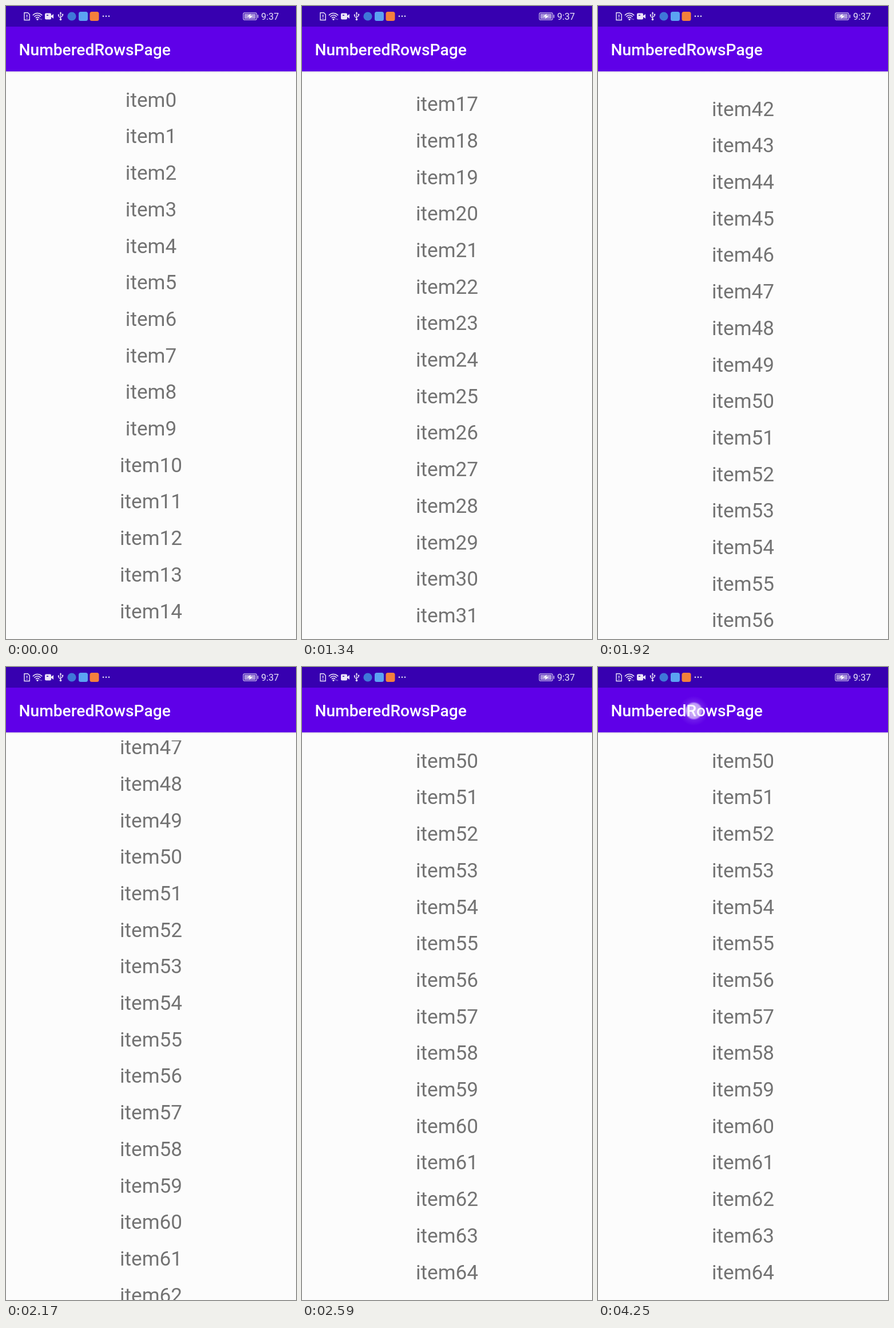
These frames come from a looping animation (507x1104 px, 4.33 s). An HTML page with a canvas:

```html
<!DOCTYPE html>
<html lang="en">
<head>
<meta charset="utf-8">
<title>Scrolling list</title>
<style>
  html, body { margin: 0; width: 100%; height: 100%; overflow: hidden; background: #fcfcfc; }
  canvas { display: block; }
</style>
</head>
<body>
<canvas id="stage" width="507" height="1104"></canvas>
<script>
const ctx = document.getElementById('stage').getContext('2d');
const W = 507, H = 1104;
const LOOP = 4330, FPS = 12;
const PITCH = 63.7, FIRST_BASELINE = 175.7, LIST_TOP = 128, BAR_BOTTOM = 114;
const FLING = { start: 1074, shown: 1090, duration: 1416, items: 50, power: 1.98 };
const INK = '#ece5f8';

function rect(x, y, w, h, color) {
  ctx.fillStyle = color;
  ctx.fillRect(x, y, w, h);
}

function roundRect(x, y, w, h, r, color) {
  ctx.fillStyle = color;
  ctx.beginPath();
  ctx.roundRect(x, y, w, h, r);
  ctx.fill();
}

function disc(x, y, r, color) {
  ctx.fillStyle = color;
  ctx.beginPath();
  ctx.arc(x, y, r, 0, Math.PI * 2);
  ctx.fill();
}

function path(d, width, color = INK) {
  const shape = new Path2D(d);
  if (width) {
    ctx.strokeStyle = color;
    ctx.lineWidth = width;
    ctx.stroke(shape);
  } else {
    ctx.fillStyle = color;
    ctx.fill(shape);
  }
}

function text(str, x, y, font, color, align = 'left') {
  ctx.font = font + ' Roboto, sans-serif';
  ctx.fillStyle = color;
  ctx.textAlign = align;
  ctx.fillText(str, x, y);
}

// The fling slows down almost evenly until it rests on a whole row.
function scrollAt(time) {
  if (time <= FLING.shown) return 0;
  const p = Math.min((time - FLING.start) / FLING.duration, 1);
  return FLING.items * PITCH * (1 - (1 - p) ** FLING.power);
}

function drawList(scroll) {
  ctx.save();
  ctx.beginPath();
  ctx.rect(0, LIST_TOP, W, H - LIST_TOP);
  ctx.clip();
  const first = Math.max(0, Math.floor(scroll / PITCH) - 1);
  for (let i = first; i < first + 18; i++) {
    text('item' + i, W / 2, FIRST_BASELINE + i * PITCH - scroll, '35.2px', '#737373', 'center');
  }
  ctx.restore();
}

function drawWifi(active) {
  ctx.lineCap = 'round';
  for (const r of [3.5, 7, 10.5]) {
    ctx.strokeStyle = INK;
    ctx.lineWidth = 1.6;
    ctx.beginPath();
    ctx.arc(55, 23, r, -Math.PI * 0.76, -Math.PI * 0.24);
    ctx.stroke();
  }
  ctx.lineCap = 'butt';
  disc(55, 23.3, 1.6, INK);
  path('M58 23.5l1.5-2.3 1.5 2.3z', 0, active ? INK : '#8a6fd0');
  path('M60.5 22.5h3l-1.5 2.3z', 0, '#8a6fd0');
}

function drawStatusBar(active) {
  rect(0, 0, W, 36, '#3700b0');
  path('M32 11.7h6.2l3 3v9.8h-9.2z', 1.4);
  path('M36.6 15v4.2M36.6 20.7v1.6', 1.5);
  drawWifi(active);
  roundRect(68, 12.5, 11, 11, 2, INK);
  path('M79 17l4-3v8l-4-3z');
  rect(71, 15.5, 3, 1.5, '#3700b0');
  path('M95.5 12.5v10.5M92 16v2.2l3.5 2.5M99 15v2.2l-3.5 2.5', 1.2);
  path('M93.6 13.2l1.9-3.2 1.9 3.2z');
  disc(95.5, 23.4, 1.8, INK);
  disc(92, 15.7, 1.3, INK);
  rect(97.8, 13.8, 2.4, 2.4, INK);
  disc(115, 18, 7.6, '#3f78d8');
  roundRect(127, 10, 16, 16, 3.5, '#5ba3f2');
  roundRect(146.5, 10, 16, 16, 3.5, '#f4803c');
  for (const x of [170, 175, 180]) disc(x, 17.8, 1.25, INK);

  ctx.strokeStyle = '#c9bbea';
  ctx.lineWidth = 1.2;
  ctx.beginPath();
  ctx.roundRect(414.8, 11.8, 23.4, 12.4, 2.5);
  ctx.stroke();
  roundRect(416.6, 13.6, 19.8, 8.8, 1.2, '#a994dc');
  rect(439.6, 15.3, 1.6, 5.4, '#c9bbea');
  path('M427.8 13.6l-6.3 5h4.4l-1 3.8 6.5-5.2h-4.5z', 0, '#fff');
  text('9:37', 446, 23.6, '16.2px', INK);
}

function drawAppBar() {
  rect(0, 36, W, BAR_BOTTOM - 36, '#5f00e8');
  const shadow = ctx.createLinearGradient(0, BAR_BOTTOM, 0, BAR_BOTTOM + 3);
  shadow.addColorStop(0, 'rgba(40,0,100,0.16)');
  shadow.addColorStop(1, 'rgba(40,0,100,0)');
  rect(0, BAR_BOTTOM, W, 3, shadow);
  text('NumberedRowsPage', 22.5, 86, '500 28.2px', '#fff');
}

function drawTouch(x, y) {
  const glow = ctx.createRadialGradient(x, y, 0, x, y, 26);
  glow.addColorStop(0, 'rgba(255,255,255,0.72)');
  glow.addColorStop(0.5, 'rgba(240,232,255,0.66)');
  glow.addColorStop(0.62, 'rgba(210,190,255,0.14)');
  glow.addColorStop(1, 'rgba(200,180,255,0)');
  disc(x, y, 26, glow);
}

function draw(now) {
  const tick = Math.floor((now % LOOP) * FPS / 1000);
  const time = Math.ceil(tick * 25 / 3) * 10;
  rect(0, 0, W, H, '#fcfcfc');
  drawList(scrollAt(time));
  drawAppBar();
  drawStatusBar(time >= 340 && time < 500);
  if (time >= 4250) drawTouch(167.5, 76.5);
  requestAnimationFrame(draw);
}

requestAnimationFrame(draw);
</script>
</body>
</html>
```
